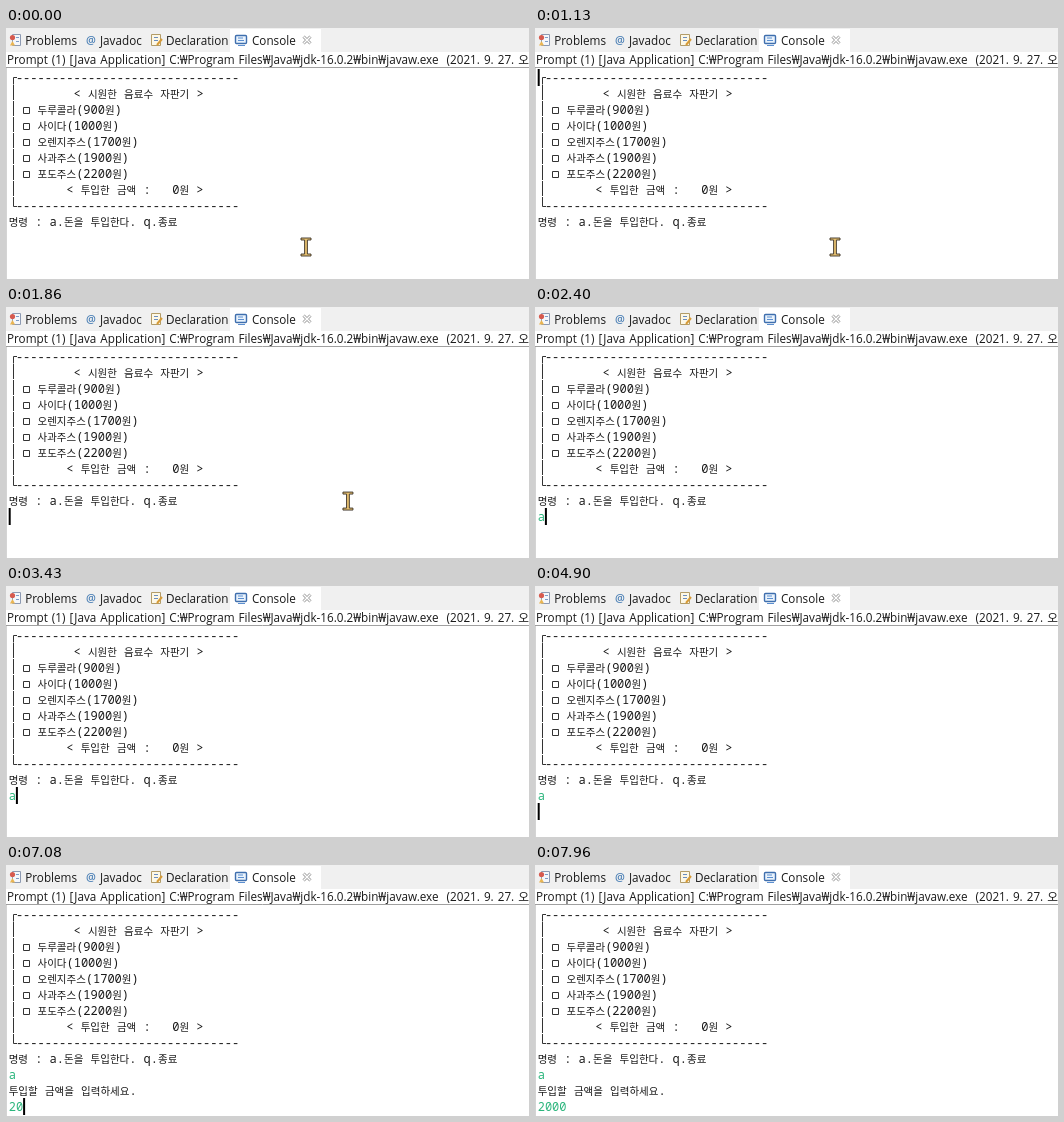
Animation, 523 px wide and 251 px high, one loop 8000 ms. Source, as an HTML page:

```html
<!DOCTYPE html>
<html lang="ko">
<head>
<meta charset="utf-8">
<title>Console</title>
<style>
  html, body { margin: 0; width: 100%; height: 100%; overflow: hidden; background: #fff; }
  svg { display: block; }
  text { white-space: pre; fill: #1a1a1a; }
  .ui { font: 11.7px "Open Sans", "Noto Sans", "Noto Sans CJK KR", sans-serif; }
  .label { word-spacing: 1px; }
  .at { font-size: 11px; font-weight: 600; fill: #4a7fb5; }
  .mono { font: 12px "Noto Sans Mono", "DejaVu Sans Mono", monospace; }
  .ko { font: 10.5px "Noto Sans CJK KR", "Noto Sans CJK", sans-serif; }
  .input { fill: #2bb57c; }
</style>
</head>
<body>
<svg width="523" height="251" viewBox="0 0 523 251">
  <rect width="523" height="251" fill="#fff"/>
  <rect width="523" height="24" fill="#f0f0f0"/>
  <rect x="224" y="1" width="91" height="24" fill="#fff"/>

  <!-- problems -->
  <path d="M6.5 6.5H14.5V17.5H6.5Z" fill="#f5f7fb" stroke="#8d9ab2"/>
  <path d="M10 9.5H13M10 13.5H13" stroke="#7d9cc8"/>
  <circle cx="6.5" cy="9.5" r="2.6" fill="#d65a4f"/>
  <path d="M4 17.5L6.500 13L9 17.500Z" fill="#eab552"/>
  <text x="80" y="16" class="ui at">@</text>
  <!-- declaration -->
  <path d="M145.5 6.5H154.5V17.5H145.5Z" fill="#fdf8e6" stroke="#b39c68"/>
  <path d="M148 9.5H152M148 12.5H152" stroke="#6a8cc0"/>
  <path d="M151 17L156 11" stroke="#d79b37" stroke-width="2"/>
  <!-- console -->
  <rect x="229.5" y="7.5" width="11" height="8" rx="1" fill="#eaf3fc" stroke="#3f6fae" stroke-width="1.4"/>
  <path d="M232 10H237M232 12.5H238M232 17.5H239" stroke="#5c8fd0"/>
  <!-- close -->
  <path d="M297.5 8.5L304.5 15.5M304.5 8.5L297.5 15.5" stroke="#999" stroke-width="3"/>
  <path d="M297.5 8.5L304.5 15.5M304.5 8.5L297.5 15.5" stroke="#fff" stroke-width="1.4"/>

  <g class="ui">
    <text x="19.3" y="17">Problems</text>
    <text x="94" y="17">Javadoc</text>
    <text x="160" y="17">Declaration</text>
    <text x="246" y="17">Console</text>
    <text x="1" y="36" class="label">Prompt (1) [Java Application] C:₩Program Files₩Java₩jdk-16.0.2₩bin₩javaw.exe  (2021. 9. 27. 오</text>
  </g>
  <path d="M0 39.5H523" stroke="#a0a0a0"/>
  <path d="M.5 40V251" stroke="#d4d4d4"/>

  <g id="lines" class="mono"></g>
  <path id="boxes" fill="none" stroke="#333"/>
  <rect id="caret" width="2" height="17"/>
  <path id="mouse" d="M-5 -9H5V-7H1.4V7H5V9H-5V7H-1.4V-7H-5Z" fill="#e6c070" stroke="#3a3226" stroke-width=".9"/>
</svg>
<script>
const LOOP = 8000, LEFT = 2.7, TOP = 41, ROW = 16, CELL = 7.2, BLINK = 530, TICK = 70;
const PROMPT_ROW = 10;
const $ = id => document.getElementById(id);
const rowTop = row => TOP + row * ROW;
const column = col => LEFT + col * CELL;

function addLine(row, text, col = 0, cls = '') {
  const html = text.replace(/</g, '&lt;').replace(/[가-힣]+/g, '<tspan class="ko">$&</tspan>');
  $('lines').insertAdjacentHTML('beforeend',
    `<text x="${column(col)}" y="${rowTop(row) + 13}" class="${cls}">${html}</text>`);
  return $('lines').lastElementChild;
}

const rule = '-'.repeat(31);
const drinks = ['두루콜라(900원)', '사이다(1000원)', '오렌지주스(1700원)', '사과주스(1900원)', '포도주스(2200원)'];
const menu = [rule, '        < 시원한 음료수 자판기 >', ...drinks.map(d => '   ' + d),
  '       < 투입한 금액 :   0원 >', rule];
menu.forEach((text, row) => addLine(row, text, 1));
addLine(9, '명령 : a.돈을 투입한다. q.종료');
const command = addLine(PROMPT_ROW, '', 0, 'input');
const question = addLine(PROMPT_ROW + 1, '투입할 금액을 입력하세요.');
const amount = addLine(PROMPT_ROW + 2, '', 0, 'input');

// Menu border and check boxes
const checks = drinks.map((_, i) => `M17.5 ${rowTop(i + 2) + 6.5}h6v6h-6z`);
const sides = menu.slice(2).map((_, i) => `M7.5 ${rowTop(i + 1)}v15`);
const corners = `M11 ${TOP + 8.5}H7.5v7M7.5 ${rowTop(8)}v9.5H11`;
$('boxes').setAttribute('d', corners + sides.join('') + checks.join(''));

// Every edit moves the caret and restarts its blinking
const answerAt = 5030, digitTimes = [6550, 7080, 7280, 7430];
const edits = [
  { at: 70 - 2 * BLINK, row: 0 },
  { at: 1460, row: PROMPT_ROW },
  { at: 2365, row: PROMPT_ROW, typed: 'a' },
  { at: 4900, row: PROMPT_ROW + 1 },
  { at: answerAt, row: PROMPT_ROW + 1 },
  ...digitTimes.map((at, i) => ({ at, row: PROMPT_ROW + 2, typed: '2000'.slice(0, i + 1) }))
];
const typedOn = (row, t) => edits.filter(e => e.row === row && e.typed && e.at <= t).pop()?.typed || '';

const show = (el, on) => el.setAttribute('visibility', on ? 'visible' : 'hidden');
// Progress of a move drawn in a few visible steps
const stepped = (t, from, steps) =>
  Math.min(1, Math.max(0, (Math.floor((t - from) / TICK) + 1) / steps));

function moveMouse(t) {
  const nudge = stepped(t, 1460, 2), glide = stepped(t, 1860, 4);
  const x = 300 + 8 * nudge + 156 * glide ** 1.1;
  const y = 219 - nudge - 35 * (1 - (1 - glide) ** 4);
  $('mouse').setAttribute('transform', `translate(${x} ${y})`);
}

function render(t) {
  const edit = edits.filter(e => e.at <= t).pop();
  show($('caret'), Math.floor((t - edit.at) / BLINK) % 2 === 0);
  $('caret').setAttribute('x', column(edit.typed?.length || 0));
  $('caret').setAttribute('y', rowTop(edit.row));
  command.textContent = typedOn(PROMPT_ROW, t);
  amount.textContent = typedOn(PROMPT_ROW + 2, t);
  show(question, t >= answerAt);
  show($('mouse'), t < 2365);
  moveMouse(t);
}

const start = performance.now();
function tick() {
  render((performance.now() - start) % LOOP);
  requestAnimationFrame(tick);
}
tick();
</script>
</body>
</html>
```
